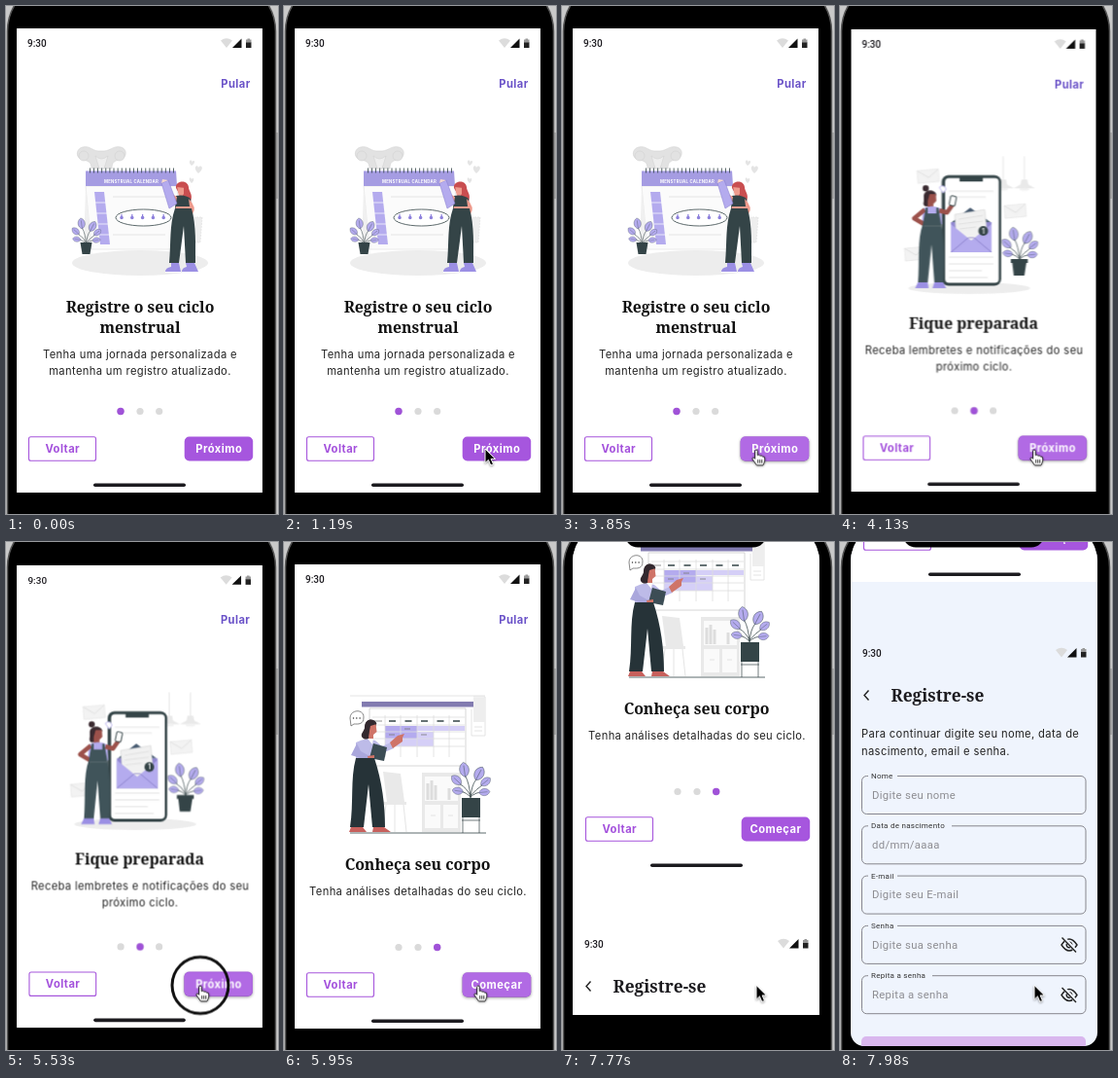
An HTML page that plays this animation: 280 px wide and 522 px high, repeating every 8000 ms.

```html
<!DOCTYPE html>
<html lang="pt">
<head>
<meta charset="utf-8">
<title>Onboarding</title>
<style>
html, body { margin: 0; width: 100%; height: 100%; overflow: hidden; background: #c9c9c9; }
svg, .screen { position: absolute; left: 0; top: 0; width: 280px; height: 522px; }
.screen { clip-path: inset(23px 16px 22px 11px); transform-origin: 138px 261px; }
.h { font: 600 15.8px "Noto Serif", serif; fill: #111; }
.b { font: 400 11.2px Inter, sans-serif; letter-spacing: .36px; fill: #222; }
.btn { font: 700 11.2px Inter, sans-serif; letter-spacing: .45px; }
.time { font: 500 10px Roboto, sans-serif; fill: #1d1b20; }
.label { font: 400 8px Roboto, sans-serif; letter-spacing: .27px; fill: #333; }
.hint { font: 400 11.3px Roboto, sans-serif; letter-spacing: .33px; fill: #8d8d92; }
.c { text-anchor: middle; }
.li { fill: #b4abee; } .da { fill: #344447; } .gr { fill: #e9e9e9; }
.ln { fill: none; stroke: #344447; stroke-width: .7; }
.gl { fill: none; stroke: #dedede; stroke-width: .8; }

.anim, .step { animation: 8s linear infinite; }
.step { animation-timing-function: step-end; }
.screen { animation-name: clip; }
.back { animation-name: back; }
.pager { animation-name: push; }
.s1 { animation-name: s1; }
.s2 { animation-name: s2; opacity: 0; }
.s3 { animation-name: s3; opacity: 0; }
.hover { animation-name: hover; opacity: 0; }
.cursor { animation-name: move; }
.arrow { animation-name: arrow; }
.hand { animation-name: hand; opacity: 0; }
.ring { animation-name: ring; r: 0; opacity: 0; }

@keyframes clip {
  0% { clip-path: inset(23px 16px 22px 11px); transform: none; }
  50% { clip-path: inset(23px 16px 22px 11px); transform: scale(.996); }
  73.5% { clip-path: inset(23px 16px 22px 11px); transform: none; }
  97.125% { clip-path: inset(-18px 15px 36px 11px round 38px 38px 0 0); transform: none; }
  98% { clip-path: inset(-18px 15px 28px 11px round 38px 38px 0 0); transform: none; }
  99.75%, 100% { clip-path: inset(-18px 15px 4px 11px round 38px 38px 14px 14px); transform: none; }
}
@keyframes back { 0%, 97.125% { fill: #fff; } 98% { fill: #f7faff; } 99.75%, 100% { fill: #eff4fd; } }
@keyframes push {
  0% { transform: none; }
  97.125% { transform: translate(1px, -160px); }
  98% { transform: translate(1px, -310px); }
  99.75%, 100% { transform: translate(1px, -459px); }
}
@keyframes s1 { 0%, 48.125% { opacity: 1; } 51.625%, 100% { opacity: 0; } }
@keyframes s2 { 0%, 48.125% { opacity: 0; } 51.625%, 71.75% { opacity: 1; } 74.375%, 100% { opacity: 0; } }
@keyframes s3 { 0%, 71.75% { opacity: 0; } 74.375%, 100% { opacity: 1; } }
@keyframes hover { 0%, 36.75% { opacity: 0; } 41%, 97.12% { opacity: 1; } 97.125%, 100% { opacity: 0; } }
@keyframes move {
  0%, 5.25% { transform: translate(172px, 524px); animation-timing-function: ease-in-out; }
  14.875%, 36.75% { transform: translate(207px, 455px); animation-timing-function: ease-in-out; }
  42%, 100% { transform: translate(200px, 455.5px); }
}
@keyframes arrow { 0% { opacity: 0; } 5.25% { opacity: 1; } 36.75% { opacity: 0; } 97.125%, 100% { opacity: 1; } }
@keyframes hand { 0% { opacity: 0; } 36.75% { opacity: 1; } 97.125%, 100% { opacity: 0; } }
@keyframes ring {
  0% { r: 0; opacity: 0; }
  24.5% { r: 23px; opacity: 1; } 25.375% { r: 19px; opacity: 1; } 28% { r: 0; opacity: 0; }
  45.5% { r: 29px; opacity: 1; } 46.375% { r: 24px; opacity: 1; } 47.25% { r: 19px; opacity: 1; } 48.125% { r: 0; opacity: 0; }
  69.125% { r: 29px; opacity: 1; } 70% { r: 24px; opacity: 1; } 70.875% { r: 19px; opacity: 1; } 71.75% { r: 0; opacity: 0; }
  94.5% { r: 29px; opacity: 1; } 95.375% { r: 24px; opacity: 1; } 96.25% { r: 19px; opacity: 1; } 97.125%, 100% { r: 0; opacity: 0; }
}
</style>
</head>
<body>
<svg viewBox="0 0 280 522">
  <rect x="278" y="130" width="3" height="68" fill="#aaa"/>
  <rect x="1.5" y="-26" width="276" height="620" rx="52" stroke="#555" stroke-width="1.5"/>
</svg>

<div class="screen step">
<svg viewBox="0 0 280 522">
<defs>
  <g id="leaf"><path d="M0 0C-6-3-6-11 0-14C6-11 6-3 0 0"/><path d="M0 0V-11" fill="none"/></g>
  <g id="plant">
    <path class="ln" d="M0 0Q-1-14-5-21M0 0Q1-12 5-17M0-2Q-4-10-10-13M0-2Q5-8 11-12M0-1Q-4-5-8-6M0-1Q5-5 8-5"/>
    <g class="li" stroke="#344447" stroke-width=".4">
      <use href="#leaf" transform="translate(-5 -20)rotate(-8)"/>
      <use href="#leaf" transform="translate(5 -17)rotate(28)"/>
      <use href="#leaf" transform="translate(-9 -13)rotate(-48)scale(.85)"/>
      <use href="#leaf" transform="translate(10 -12)rotate(52)scale(.8)"/>
      <use href="#leaf" transform="translate(-7 -6)rotate(-82)scale(.75)"/>
      <use href="#leaf" transform="translate(8 -5)rotate(84)scale(.75)"/>
    </g>
  </g>
  <g id="mail"><path d="M0 0L22-2 23 11 1 13Z" fill="#f3f3f3" stroke="#e2e2e2" stroke-width=".6"/><path class="gl" d="M0 0L12 7 22-2"/></g>
  <g id="lamp"><path class="gl" d="M0 0V26"/><path class="gr" d="M-3 24H3L4 29 11 33H-11L-4 29Z"/><ellipse cy="34" rx="5" ry="1.5" fill="#f2f2f2"/></g>
  <g id="status">
    <text class="time" x="22" y="42">9:30</text>
    <path d="M221 35.500Q227 31 233 35.500L227 43Z" fill="#dcdcdc"/>
    <path d="M233 43L242.500 33.500V43Z" fill="#111"/>
    <path d="M247 34.500H248.500V33.500H251V34.500H252.500V38H247Z" fill="#999"/><path d="M247 37.500h5.500v5.500h-5.500z" fill="#222"/>
  </g>
  <g id="eye" fill="none" stroke="#222" stroke-width="1.4">
    <path d="M-8 0Q0-12 8 0Q0 12-8 0Z"/><circle r="2.800"/>
    <path d="M-6.500-8L7.500 7" stroke="#eff4fd" stroke-width="3.500"/><path d="M-7.500-7.500L7 7.500"/>
  </g>
</defs>

<rect class="back step" y="-20" width="280" height="560" fill="#fff"/>
<g class="pager step">
  <path d="M0 23H280V500H0Z" fill="#fff"/>
  <use href="#status"/>
  <text class="btn c" x="236.500" y="83.500" fill="#6a52c8">Pular</text>
  <g fill="#dadada"><circle cx="118" cy="416.500" r="3.600"/><circle cx="138" cy="416.500" r="3.600"/><circle cx="157.700" cy="416.500" r="3.600"/></g>
  <rect x="23.500" y="442.700" width="69" height="24.500" rx="2" fill="#fff" stroke="#a656dc" stroke-width="1.100"/>
  <text class="btn c" x="58.300" y="459.300" fill="#a350dc">Voltar</text>
  <rect x="183.700" y="442.500" width="70.500" height="25" rx="5" fill="#a656de"/>
  <rect class="hover anim" x="183.700" y="442.500" width="70.500" height="25" rx="5" fill="#b16ae4" style="filter:drop-shadow(0 1px 1.500px #0006)"/>
  <rect x="90" y="490.500" width="95" height="3.600" rx="1.800" fill="#1c1b1f"/>

  <!-- calendar -->
  <g class="s1 anim">
    <ellipse cx="138" cy="264" rx="70" ry="13" fill="#ededed"/>
    <g fill="#e2e2e2" stroke="#d2d2d2" stroke-width=".6">
      <path d="M88 167C88 160 84 159 79 158C72 157 71 147 79 145C87 143 89 150 98 149C107 150 110 143 118 145C126 147 124 157 117 158C112 159 109 160 109 167Z"/>
      <circle cx="80" cy="154" r="5"/><circle cx="117" cy="154" r="5"/><path d="M92 154Q98 160 105 154L101 167H96Z" fill="#eee"/>
    </g>
    <path d="M82 185H176L180 250H88Z" fill="#fbfbfb" stroke="#ddd" stroke-width=".6"/>
    <path d="M82 185L88 250H80Z" fill="#f0f0f0"/>
    <path d="M82 169.500H175L176 185H82Z" fill="#a59ce2"/>
    <path d="M86 169H174" fill="none" stroke="#344447" stroke-width="5" stroke-dasharray=".8 3.300"/>
    <text class="c" x="129" y="181.700" fill="#fff" style="font:700 4.300px Inter,sans-serif;letter-spacing:.25px">MENSTRUAL CALENDAR</text>
    <path class="li" d="M91 191H101L107 245H97Z"/>
    <path d="M92 202H103M93 213H104M95 224H105M96 235H106" stroke="#fff" stroke-width=".7"/>
    <path class="gl" d="M110 196H165M110 235H164"/>
    <ellipse cx="141.500" cy="217.500" rx="28.500" ry="8.500" fill="#fff" stroke="#344447" stroke-width=".8"/>
    <path d="M119 217.500H166" stroke="#8d80dc" stroke-width="3.600" stroke-linecap="round" stroke-dasharray="0 10.800"/>
    <path d="M119 214V217M129.800 214V217M140.600 214V217M151.400 214V217M162.200 214V217" stroke="#8d80dc" stroke-width="1.200"/>
    <use href="#plant" transform="translate(82.500 245)scale(.8)"/>
    <path class="da" d="M76.500 243H88.500L86.500 255H78.500Z"/>
    <path fill="#e4e4e4" d="M190 163C187 159 191 157 191.500 160C194 157 196 161 191 164ZM197 171C192 166 197 162 198 166C201 162 205 167 198 172ZM190 181C187 177 190 175 191 178C193 175 195 179 191 182Z"/>
    <path d="M190 217H202L200 243H191Z" fill="#eee" stroke="#ddd" stroke-width=".6" stroke-dasharray="2 1"/>
    <path fill="#c94e50" d="M175 187C174 179 187 178 188 186C188 191 193 193 190 201C186 205 184 197 180 196Z"/>
    <path fill="#ee9b8d" d="M176 185H183V193L181 196H178Z"/>
    <path fill="#c94e50" d="M175 186C177 181 185 181 185 187Z"/>
    <path class="da" d="M175 195Q184 193 190 198L191 208H174Z"/>
    <path fill="#ee9b8d" d="M188 198Q197 207 192 214L185 212 189 206ZM176 196L167 191 165 194 175 202ZM175 206H190V209H174Z"/>
    <path class="li" d="M160 182L167 179 176 203 168 208Z" stroke="#8379cd" stroke-width=".5"/>
    <path d="M160 182L161 178 167 179Z" fill="#f3d8cf"/>
    <path class="da" d="M174 208H191C196 226 195 246 195 264H185L183 226 178 264H168C170 243 168 225 174 208Z"/>
    <path fill="#9b8fe4" d="M170 264H178L180 273H164Q164 269 170 268ZM185 264H194L198 273H181Q181 269 186 268Z"/>
    <path d="M164 273.500H180M181 273.500H198" stroke="#fff"/>
    <g class="h c"><text x="138" y="315">Registre o seu ciclo</text><text x="138" y="336">menstrual</text></g>
    <g class="b c"><text x="138" y="361.500">Tenha uma jornada personalizada e</text><text x="138" y="379">mantenha um registro atualizado.</text></g>
    <circle cx="118" cy="416.500" r="3.700" fill="#a052d8"/>
    <text class="btn c" x="219.300" y="459.300" fill="#fff">Próximo</text>
  </g>

  <!-- reminders -->
  <g class="s2 anim">
    <ellipse cx="133" cy="290" rx="63" ry="6" fill="#ededed"/>
    <use href="#lamp" x="168" y="154"/><use href="#lamp" x="190" y="154"/>
    <use href="#mail" x="79" y="169"/><use href="#mail" x="169" y="205"/><use href="#mail" x="66" y="249"/>
    <rect x="104.500" y="173.500" width="61.500" height="114" rx="7" fill="#344447"/>
    <rect x="108" y="176.500" width="55.500" height="108" rx="4" fill="#fff"/>
    <path class="da" d="M123 175H147V180H123Z"/>
    <path class="gl" d="M112 190H158M112 196H150M112 258H158M112 265H158M112 272H146M112 279H152"/>
    <path fill="#465a70" d="M115 222L134 207 155 222Z"/>
    <path fill="#9188d2" d="M114 222H156V253H114Z"/>
    <path d="M118 214L149 209 152 240 120 244Z" fill="#f1f1f1" stroke="#ccc" stroke-width=".5"/>
    <path class="gl" d="M122 219L147 215M122 224L147 221M123 229L140 227"/>
    <path class="li" d="M114 224L135 241 156 224V253H114Z"/><path d="M114 253L132 238H138L156 253" fill="none" stroke="#8178c4" stroke-width=".7"/>
    <circle cx="147.500" cy="231" r="5" class="da"/>
    <text class="c" x="147.500" y="233.500" fill="#fff" style="font:600 7px Inter,sans-serif">1</text>
    <use href="#plant" transform="translate(185 261)"/>
    <path class="da" d="M176 260H193.500V264H192L190 277H179L177.500 264H176Z"/>
    <g fill="#3a2a30"><circle cx="88" cy="187" r="3.200"/><path d="M86 196C85 188 98 187 99 194L94 199 93 205Q84 208 86 200Z"/></g>
    <path fill="#9c514b" d="M92 193L98.500 193 99 200 96 203V207H90V200Z"/>
    <path class="li" d="M85 208Q94 203 104 208L105 224H84Z"/>
    <path d="M87 209L76 218 88 225M102 210L110 212 117 202" fill="none" stroke="#9c514b" stroke-width="4.500" stroke-linejoin="round"/>
    <rect x="113" y="195" width="6" height="10" rx="1.500" fill="#fff" stroke="#344447" transform="rotate(12 116 200)"/>
    <path d="M102 186Q107 182 109 188L106 192Z" fill="#fff" stroke="#b4abee" stroke-width=".8"/>
    <path fill="#40545a" d="M88 207H90V213H99V207H101L104 224C108 245 107 266 106 285H97L94 245 90 285H80C82 262 79 240 85 224Z"/>
    <path class="ln" d="M86 226H104" style="stroke:#6b7a7c"/>
    <path fill="#9b8fe4" d="M80 284H90L91 290H77ZM97 284H106L109 290H95Z"/>
    <text class="h c" x="137.500" y="331.500">Fique preparada</text>
    <g class="b c"><text x="138" y="357.500">Receba lembretes e notificações do seu</text><text x="138" y="374.500">próximo ciclo.</text></g>
    <circle cx="138" cy="416.500" r="3.700" fill="#a052d8"/>
    <text class="btn c" x="219.300" y="459.300" fill="#fff">Próximo</text>
  </g>

  <!-- analysis -->
  <g class="s3 anim">
    <path class="gl" d="M68 158H207M195 159H207V199H193V172"/>
    <path fill="#eee" d="M195 160H207V185H195Z"/><path class="gl" d="M196 190H204M196 194H204"/>
    <path d="M80 164H195V169.500H80Z" fill="#827bb0"/>
    <path d="M88 171H187V230H88Z" fill="#fff" stroke="#ccc" stroke-width=".8"/>
    <path d="M104 189H186V194H104ZM104 195H154V210H104Z" fill="#d5cff7"/>
    <path class="li" d="M104 189H137V202H104Z"/>
    <path class="gl" d="M91 180H186M91 188H186M91 195H186M91 202H186M91 210H186M104 178V221M120 178V221M137 178V221M154 178V221M170 178V221"/>
    <path d="M108 184H183" stroke="#344447" stroke-width="1.300" stroke-dasharray="7 9.500"/>
    <path d="M93 184H101M108 198H114M124 192H130M141 198H147" stroke="#777" stroke-width=".8"/>
    <path class="gr" d="M102 236L120 238 124 267H106ZM102 267H126V270H102Z"/><path class="gl" d="M105 270L101 298M123 270L126 298M114 270V298"/>
    <path class="gr" d="M142 237H182V298H142Z"/><path fill="#fafafa" d="M145 241H179V266H145ZM145 270H161V294H145ZM164 270H179V294H164Z"/>
    <path d="M148 265V248M152 265V245M156 265V250M170 265V253" stroke="#ddd" stroke-width="3"/><path class="gl" d="M151 281H156M169 281H174"/>
    <path d="M68 299H208" stroke="#344447" stroke-width=".8"/>
    <use href="#plant" transform="translate(192 263)scale(1.080)"/>
    <path class="da" d="M183 263H202V283H183Z"/><path class="ln" d="M184 281V299M201 281V299M183 286H202"/>
    <path d="M68 181C68 172 82 171 82 180C82 188 76 187 72 187L69 189Z" fill="#fff" stroke="#555" stroke-width=".7"/>
    <path d="M71.500 181H80" stroke="#333" stroke-width="1.500" stroke-linecap="round" stroke-dasharray="0 3.300"/>
    <path fill="#33292f" d="M84 190C82 181 94 180 95 187L91 200C88 205 78 203 80 197Z"/>
    <path fill="#cf7468" d="M88 187H94.500L95.500 195 92 198V203H87Z"/>
    <path fill="#33292f" d="M83 190C83 181 94 181 95.500 187L89 189 87 199 82 201Z"/>
    <path fill="#bdbbe8" d="M74 206Q84 200 94 204L101 210 110 206 113 212 101 217 95 214 93 225H74Z"/>
    <path fill="#fff" d="M86 202L92 202 91 208Z"/>
    <path fill="#cf7468" d="M109 206L117 199 124 197 122 201 122 205 112 212Z"/>
    <path d="M92 207L106 211 103 225 88 222Z" fill="#3c4d55"/>
    <path fill="#aaa7dc" d="M75 207L69 219 88 225 90 221 79 215Z"/><path fill="#cf7468" d="M86 220L93 219 93 223 87 225Z"/>
    <path fill="#263338" d="M74 222H93C101 246 104 270 104 293H91L87 249 82 293H68C72 268 68 244 74 222Z"/>
    <path fill="#c7605c" d="M69 293H81L85 298H67ZM92 293H103L110 298H91Z"/>
    <text class="h c" x="137.500" y="336.500">Conheça seu corpo</text>
    <text class="b c" x="138" y="362.500">Tenha análises detalhadas do seu ciclo.</text>
    <circle cx="157.700" cy="416.500" r="3.700" fill="#a052d8"/>
    <text class="btn c" x="219" y="459.300" fill="#fff">Começar</text>
  </g>

  <!-- sign-up -->
  <g transform="translate(-1 459)">
    <use href="#status" x="1" y="75.500"/>
    <path d="M29.500 152.500L25 157.500 29.500 162.500" fill="none" stroke="#222" stroke-width="1.400"/>
    <text x="52.500" y="163.500" style="font:600 17.300px 'Noto Serif',serif" fill="#1c1b1f">Registre-se</text>
    <g class="b"><text x="22" y="201">Para continuar digite seu nome, data de</text><text x="22" y="218.500">nascimento, email e senha.</text></g>
    <g id="form"></g>
    <use href="#eye" x="236" y="414"/><use href="#eye" x="236" y="465.500"/>
    <rect x="22" y="508" width="231" height="30" rx="5" fill="#d9b7ee"/>
  </g>
</g>
</svg>
</div>

<svg viewBox="0 0 280 522">
  <rect x="65" y="-20" width="145" height="25.500" rx="13"/>
  <g class="cursor anim">
    <circle class="ring step" fill="none" stroke="#111" stroke-width="3"/>
    <path class="arrow step" d="M0 0V14.500L3.400 11.400 5.800 17 8.500 15.800 6.100 10.400H10.600Z" stroke="#fff" stroke-width="1" style="filter:drop-shadow(0 1px 1px #0006)"/>
    <path class="hand step" transform="scale(.88)" d="M-1.500 2C-1.500 0 1.500 0 1.500 2V7Q3.500 5.500 4.500 7.500Q6.500 6.500 7.300 8.500Q10 8 10 10.500V13Q9.500 16 8 18.500H0.500Q-2 15-4.500 11.500C-5 9.500-3 9-1.500 11ZM2 12V16M4.300 12V16M6.600 12V16" fill="#fff" stroke="#111" stroke-width="1" stroke-linejoin="round" style="filter:drop-shadow(0 1px 1px #0005)"/>
  </g>
</svg>
<script>
const fields = [
  ['Nome', 'Digite seu nome', 30],
  ['Data de nascimento', 'dd/mm/aaaa', 86],
  ['E-mail', 'Digite seu E-mail', 30],
  ['Senha', 'Digite sua senha', 30],
  ['Repita a senha', 'Repita a senha', 66]
];
document.getElementById('form').innerHTML = fields.map(([label, hint, gap], i) => {
  const y = 240.5 + i * 51.3;
  return `<rect x="22.500" y="${y}" width="230.500" height="39" rx="5" fill="none" stroke="#7b7a80" stroke-width=".9"/>
    <rect x="29" y="${y - 2}" width="${gap}" height="4" fill="#eff4fd"/>
    <text class="label" x="32" y="${y + 2.5}">${label}</text>
    <text class="hint" x="33" y="${y + 23.2}">${hint}</text>`;
}).join('');
</script>
</body>
</html>
```
